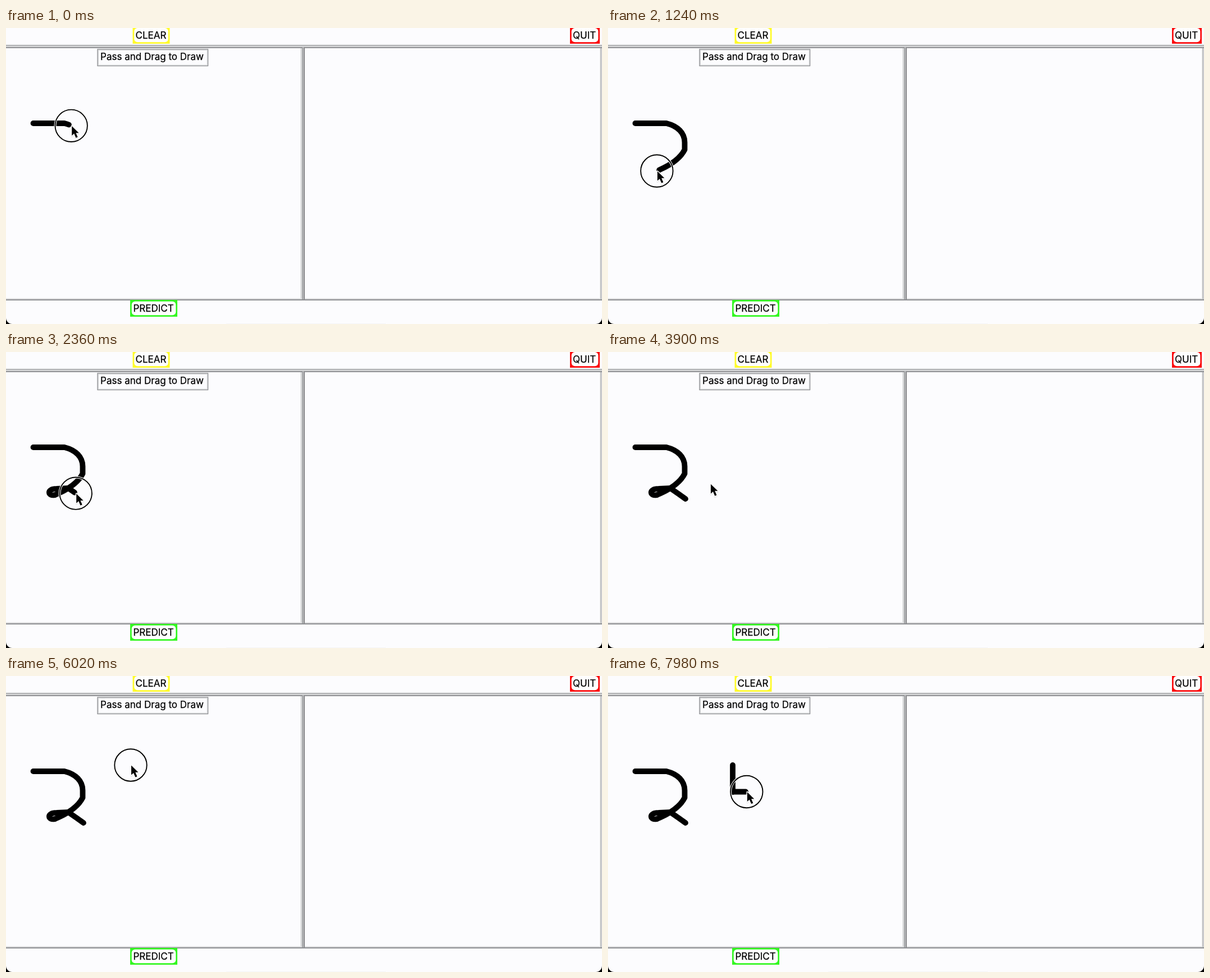
These frames come from a looping animation (1061 px wide and 528 px high, 8 s). An HTML page:

```html
<!DOCTYPE html>
<html lang="en">
<head>
<meta charset="utf-8">
<title>Digit drawing pad</title>
<style>
  html, body { margin: 0; width: 100%; height: 100%; overflow: hidden; background: #fcfcfe; }
  svg { display: block; width: 1061px; height: 528px; }
  text { font: 17px Inter, Roboto, sans-serif; fill: #000; stroke: #000; stroke-width: .25px; text-anchor: middle; }
  .leg { fill: none; stroke-linecap: round; stroke-linejoin: round; }
  .ink { stroke: #000; stroke-width: 9.8px; }
  .face { fill: #fefefe; }
  .dark { fill: #8e8f92; }
  .mid { fill: #b4b5b7; }
  .light { fill: #dedfe0; }
</style>
</head>
<body>
<svg viewBox="0 0 1061 528">
  <rect width="1061" height="528" fill="#fcfcfe"/>

  <!-- Toolbar edge -->
  <rect class="light" y="29" width="1061" height="2"/>
  <rect class="dark" y="31" width="1061" height="1"/>
  <rect class="light" y="32" width="1061" height="2"/>

  <!-- Left pane -->
  <rect class="dark" y="34" width="527" height="2"/>
  <rect class="light" x="524" y="36" width="3" height="448"/>
  <rect class="light" y="482" width="527" height="2"/>

  <!-- Divider -->
  <rect class="dark" x="527" y="34" width="1.5" height="451"/>
  <rect class="mid" x="528.5" y="34" width="1.5" height="451"/>

  <!-- Right pane -->
  <rect class="dark" x="530" y="34" width="531" height="2"/>
  <rect class="dark" x="530" y="34" width="2" height="450"/>
  <rect class="light" x="1057" y="36" width="2" height="448"/>
  <rect class="light" x="532" y="482" width="527" height="2"/>
  <rect class="dark" x="1059" y="34" width="1" height="451"/>
  <rect class="dark" y="484" width="1061" height="2"/>

  <!-- Hint -->
  <rect x="163" y="38" width="196.5" height="29.5" fill="#fcfcfe" stroke="#8e8f92" stroke-width="1.4"/>
  <rect x="164.5" y="39.5" width="193.5" height="26.5" fill="none" stroke="#d4d5d7"/>
  <text x="260" y="57">Pass and Drag to Draw</text>

  <!-- Buttons -->
  <rect x="225.5" y="-2" width="66" height="30" fill="#fffb2a"/>
  <rect class="face" x="228.2" y="0" width="60.6" height="25.3" rx="6"/>
  <text x="258" y="19">CLEAR</text>
  <rect x="1004" y="-2" width="53" height="30" fill="#fb0a0c"/>
  <rect class="face" x="1006.7" y="0" width="47.6" height="25.3" rx="6"/>
  <text x="1029.7" y="19">QUIT</text>
  <rect x="221" y="485" width="84" height="30" fill="#34f722"/>
  <rect class="face" x="223.7" y="487.7" width="78.6" height="24.6" rx="6"/>
  <text x="262.5" y="505.5">PREDICT</text>

  <!-- Window corners -->
  <path d="M0 517A11 11 0 0 0 11 528H0ZM1061 517A11 11 0 0 1 1050 528H1061Z"/>
  <path d="M392 527.5H676" stroke="#f4f4f6"/>

  <!-- Pointer route, one leg after another; inked legs leave a line -->
  <path class="leg ink" data-from="-738" data-to="1240"
        d="M48.5 170H104C124 175 136.5 187 136.5 204V217C130 230 116 243 87 255"/>
  <path class="leg ink" data-from="1240" data-to="2650"
        d="M87 255C75 258 71 244 90 244L111 243 124 252 138 262"/>
  <path class="leg" data-from="3340" data-to="4880" d="M138 262Q165 252 182 235L243 168"/>
  <path class="leg" data-from="4900" data-to="5600" d="M243 168Q238 156 222 159"/>
  <path class="leg ink" data-from="6150" data-to="7000" d="M222 159V207"/>
  <path class="leg ink" data-from="7300" data-to="8000" d="M222 206.5H247.5"/>

  <g id="pointer">
    <g id="ring" fill="none">
      <circle r="28.7" stroke="#fff" stroke-width="4"/>
      <circle r="28.7" stroke="#000" stroke-width="1.9"/>
    </g>
    <g transform="translate(1 .6)" stroke-linejoin="round">
      <path d="M0 2V19L4 15.3 7.3 23 10.5 21.6 7.3 14.2H12.5Z" stroke="#000" stroke-width="3" opacity=".06"/>
      <path d="M0 0V17L4 13.3 7.3 21 10.5 19.6 7.3 12.2H12.5Z" stroke="#fff" stroke-width="2.8" paint-order="stroke"/>
    </g>
  </g>
</svg>
<script>
const LOOP = 8000, INK_LAG = 50, RELEASE = 2950, PRESS = 5900;

const pointer = document.getElementById('pointer');
const ring = document.getElementById('ring');
const legs = [...document.querySelectorAll('.leg')].map(path => ({
  path,
  from: +path.dataset.from,
  to: +path.dataset.to,
  length: path.getTotalLength(),
  inked: path.classList.contains('ink')
}));

const show = (node, on) => node.setAttribute('visibility', on ? 'visible' : 'hidden');

// Distance covered along a leg at constant speed
const covered = ({ from, to, length }, t) =>
  length * Math.min(1, Math.max(0, (t - from) / (to - from)));

function draw() {
  const t = performance.now() % LOOP;

  const leg = legs.findLast(l => l.from <= t);
  const { x, y } = leg.path.getPointAtLength(covered(leg, t));
  pointer.setAttribute('transform', `translate(${x} ${y})`);
  show(ring, t < RELEASE || t >= PRESS);

  for (const l of legs.filter(l => l.inked)) {
    const inkTime = t - INK_LAG;
    show(l.path, inkTime >= l.from);
    l.path.setAttribute('stroke-dasharray', `${covered(l, inkTime)} ${2 * l.length}`);
  }
  requestAnimationFrame(draw);
}
draw();
</script>
</body>
</html>
```
